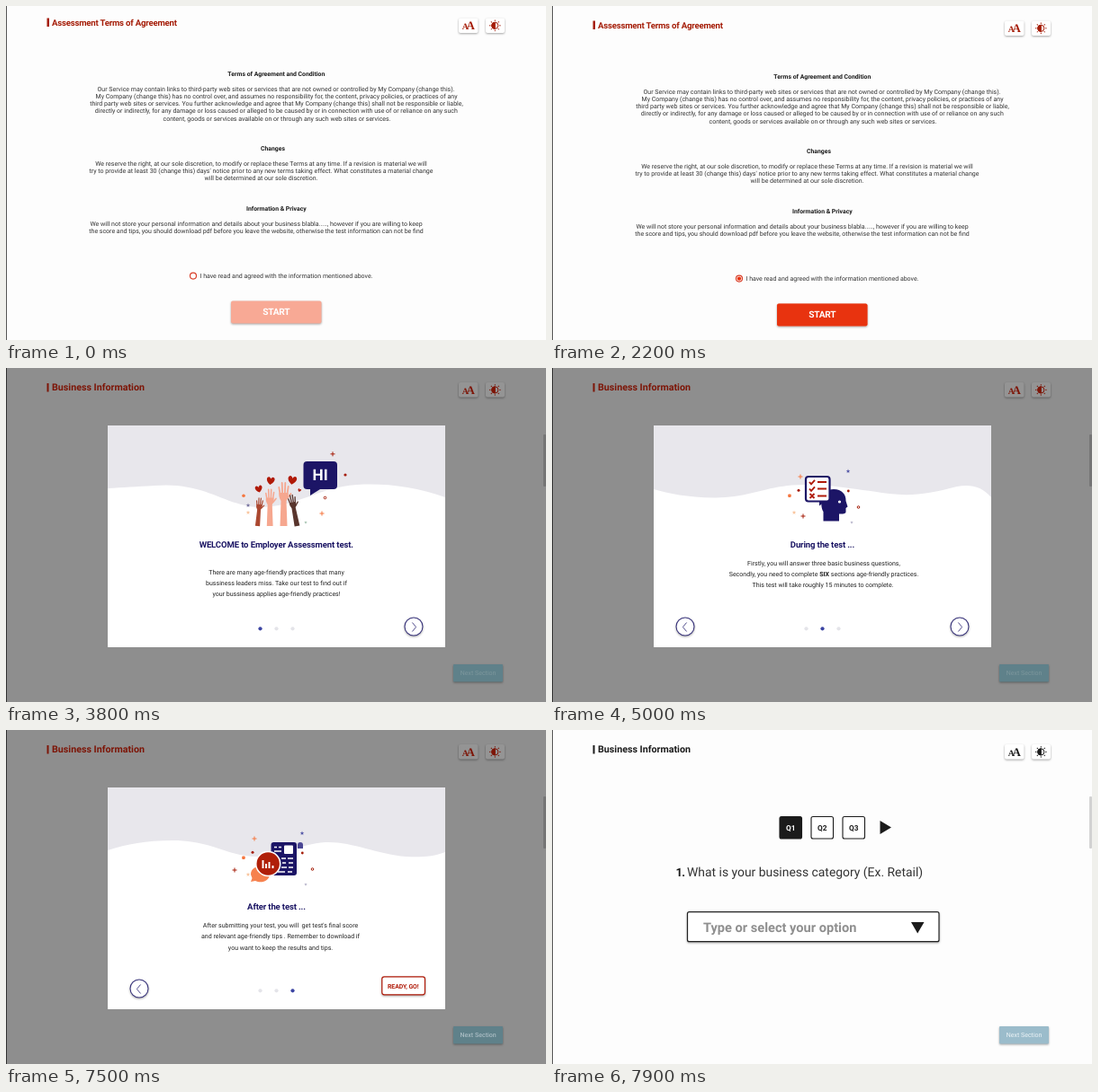
Write an HTML page that moves like this. It is 600 px wide and 372 px high and loops after 8000 ms.

```html
<!DOCTYPE html>
<html lang="en">
<head>
<meta charset="utf-8">
<title>Assessment</title>
<style>
html, body { margin: 0; width: 100%; height: 100%; overflow: hidden; background: #fdfdfd; }
svg { display: block; width: 600px; height: 372px; }
text { font-family: Roboto, "Liberation Sans", sans-serif; text-anchor: middle; text-rendering: geometricPrecision; white-space: pre; }
.l { text-anchor: start; }
.b { font-weight: 700; }
.t { font-weight: 700; letter-spacing: -.13px; fill: #1a1463; }
.serif { font-family: "Liberation Serif", serif; font-weight: 700; }
.chip { filter: drop-shadow(0 1px 1px rgba(0, 0, 0, .35)); }
</style>
</head>
<body>
<svg id="stage" viewBox="0 0 600 372"></svg>
<script>
const RED = '#a51d08', NAVY = '#1c1566', ORANGE = '#f5763f', PEACH = '#f6a78f', INK = '#1b1b1b';

const text = (x, y, s, size = 7, attr = '') => `<text x="${x}" y="${y}" font-size="${size}" ${attr}>${s}</text>`;
const rect = (x, y, w, h, fill, r = 0, attr = '') =>
  `<rect x="${x}" y="${y}" width="${w}" height="${h}" rx="${r}" fill="${fill}" ${attr}/>`;
const path = (d, fill = 'none', attr = '') => `<path d="${d}" fill="${fill}" ${attr}/>`;
const line = (d, color, w, attr = '') => path(d, 'none', `stroke="${color}" stroke-width="${w}" ${attr}`);
const dot = (x, y, r, fill, attr = '') => `<circle cx="${x}" cy="${y}" r="${r}" fill="${fill}" ${attr}/>`;
const group = (id, body, attr = '') => `<g id="${id}" ${attr}>${body}</g>`;
const lines = (rows, size) => rows.map(([x, y, s]) => text(x, y, s, size)).join('');

const plus = (x, y, c, r = 2.5) => line(`M${x - r} ${y}h${2 * r}M${x} ${y - r}v${2 * r}`, c, 1);
const ring = (x, y, c) => dot(x, y, 1.3, 'none', `stroke="${c}" stroke-width="1"`);
const heart = (x, y, s, r) =>
  path('M0 4C-7-1-4-5-2-4.5Q-.5-4 0-2.4Q.5-4 2-4.5C4-5 7-1 0 4Z', '#b01a08',
    `transform="translate(${x} ${y}) rotate(${r}) scale(${s})"`);
function star(x, y, c, r = 2.4) {
  let d = 'M';
  for (let i = 0; i < 10; i++) {
    const a = i * Math.PI / 5, q = i % 2 ? r * .45 : r;
    d += `${x + q * Math.sin(a)} ${y - q * Math.cos(a)} `;
  }
  return path(d + 'Z', c);
}
const hand = (x, s, lean, c) => `<g transform="translate(${x} 176) rotate(${lean}) scale(${s})">` +
  path('M-4 0L-3-28Q-6-33-5-37H5Q6-33 3-28L4 0Z', c) +
  line('M-4-36L-5.2-43M-1.4-37L-1.8-48M1.4-37L1.8-48M4-36L5.2-44M4-31L8-36', c, 1.8, 'stroke-linecap="round"') + '</g>';

// Text size and contrast buttons
function icons(dy, ink, chip) {
  let rays = '';
  for (let i = 0; i < 8; i++) rays += `<path d="M0-4.9V-6.3" transform="rotate(${i * 45})"/>`;
  return `<g transform="translate(0 ${dy})">` +
    rect(503, 13.5, 21.5, 16.5, chip, 2, 'class="chip"') + rect(533, 13.5, 21, 16.5, chip, 2, 'class="chip"') +
    text(510.4, 26.2, 'A', 9.8, `class="serif" fill="${ink}"`) +
    text(516.2, 26.2, 'A', 13, `class="serif" fill="${ink}"`) +
    `<g transform="translate(543.3 21.8)" stroke="${ink}" stroke-width="1">${rays}` +
    dot(0, 0, 3.6, 'none') + path('M0-3.6A3.6 3.6 0 0 0 0 3.6Z', ink) + '</g></g>';
}
const businessHeader = (ink, chip) => rect(45.5, 17, 2, 9.5, ink) +
  text(51, 25.4, 'Business Information', 10.7, `class="l b" fill="${ink}"`) + icons(2.6, ink, chip);
const nextButton = (fill, ink, id) => rect(497, 330, 55, 19.5, fill, 1, 'class="chip"') +
  text(524.6, 341.8, 'Next Section', 7.05, `id="${id}" fill="${ink}"`);
const leftEdge = color => rect(0, 0, 1, 372, color);
const scrollbar = color => rect(597, 74, 3, 58, color, 1);

const terms = rect(45.5, 13.5, 2.5, 9.5, RED) +
  text(51, 22, 'Assessment Terms of Agreement', 9.6, `class="l b" fill="${RED}" letter-spacing="-.2"`) +
  icons(0, RED, '#fff') +
  text(300.3, 77.5, 'Terms of Agreement and Condition', 6.85, 'class="b"') +
  text(296.5, 161, 'Changes', 6.85, 'class="b"') +
  text(300.3, 227.8, 'Information &amp; Privacy', 6.85, 'class="b"') +
  group('body', lines([
    [300, 95, 'Our Service may contain links to third-party web sites or services that are not owned or controlled by My Company (change this).'],
    [300.5, 103, 'My Company (change this) has no control over, and assumes no responsibility for, the content, privacy policies, or practices of any'],
    [300.5, 111.2, 'third party web sites or services. You further acknowledge and agree that My Company (change this) shall not be responsible or liable,'],
    [300.3, 119.4, 'directly or indirectly, for any damage or loss caused or alleged to be caused by or in connection with use of or reliance on any such'],
    [301, 127.5, 'content, goods or services available on or through any such web sites or services.'],
    [283.5, 178, 'We reserve the right, at our sole discretion, to modify or replace these Terms at any time. If a revision is material we will'],
    [283.5, 186, "try to provide at least 30 (change this) days' notice prior to any new terms taking effect. What constitutes a material change"],
    [283.5, 194, 'will be determined at our sole discretion.'],
    [278, 244.5, 'We will not store your personal information and details about your business blabla....., however if you are willing to keep'],
    [278, 253, 'the score and tips, you should download pdf before you leave the website, otherwise the test information can not be find'],
    [311.5, 303.3, 'I have read and agreed with the information mentioned above.']
  ]), 'fill="#333"') +
  dot(208, 300.6, 3.5, '#fff', 'stroke="#d9402a" stroke-width="1.2"') +
  rect(250, 328.5, 100.5, 25, '#f8a995', 2, 'class="chip"') +
  group('agreed', dot(208, 300.6, 2.2, '#e8330f') + rect(250, 328.5, 100.5, 25, '#e8330f', 2)) +
  text(300.3, 344.2, 'START', 10.2, 'class="b" fill="#fff" letter-spacing="-.3"');

const qBox = (x, s, fill, ink) => rect(x, 96.5, 24.5, 24.5, fill, 2, `stroke="${INK}" stroke-width="1.1"`) +
  text(x + 12.2, 111.7, s, 8.3, `class="b" fill="${ink}"`);
const question = rect(0, 0, 600, 372, '#fdfdfd') + businessHeader(INK, '#fff') +
  qBox(253, 'Q1', INK, '#fff') + qBox(288, 'Q2', '#fff', INK) + qBox(323, 'Q3', '#fff', INK) +
  path('M364.5 101L377 108.5L364.5 116Z', INK) +
  text(137.5, 162.8, '1.', 13, 'class="l b" letter-spacing="-.8"') +
  text(150, 162.8, 'What is your business category (Ex. Retail)', 13.9, 'class="l" fill="#333"') +
  rect(150.5, 202.7, 279.5, 33, '#fff', 2, 'stroke="#222" stroke-width="1.2" class="chip"') +
  text(168, 224.5, 'Type or select your option', 14.6, 'class="l b" fill="#8f8f8f"') +
  path('M399 214H413.5L406.2 226.5Z', INK) + nextButton('#9bbccb', '#edf4f7', 'nextPlain') +
  leftEdge('#555') + scrollbar('#d2d2d2');

const wave = curve => path(`M113 64H488V${curve}Z`, '#e8e7ec');
const arrow = (x, dir) => dot(x, 288, 10, '#fff', 'stroke="#39347c" stroke-width="1.1" class="chip"') +
  line(`M${x - dir * 1.6} 283.5l${dir * 4.2} 5l${-dir * 4.2} 5`, '#39347c', .9);
const pager = n => [0, 1, 2].map(i => dot(282.5 + 18 * i, 290.3, 2.1, i === n ? '#3c45a3' : '#e4e4e9')).join('');
const confetti = plus(276, 121, ORANGE) + star(329, 115, '#5558a8') + rect(262.2, 140.5, 3.5, 3.5, ORANGE, 1) +
  dot(274, 136.3, 1.5, RED) + dot(329.3, 137, 1.4, RED) + ring(340.5, 155, RED) + star(269, 161, '#f9c49c') +
  star(333, 172, '#b9b6cc', 1.8);

const welcome = wave('144C455 132 420 128 390 130C345 133 325 155 280 155C245 154 220 126 165 131C145 132 130 133 113 134') +
  hand(293.2, .85, 0, PEACH) + hand(308.5, 1, 0, PEACH) + hand(279.5, .65, 5, '#ab4830') + hand(323.5, .73, -11, '#59352d') +
  heart(281, 135, .9, -12) + heart(294, 126, 1, 8) + heart(318, 125.5, 1.1, 10) + heart(326, 136.3, .4, 20) +
  rect(330.5, 104, 37.5, 31, NAVY, 4) + path('M338 134V142L349 135Z', NAVY) +
  text(349.2, 125.2, 'HI', 17.2, 'class="b" fill="#fff"') +
  plus(363, 95.8, RED) + dot(377, 119, 1.6, RED) + ring(354.5, 144.5, RED) + plus(351, 162, ORANGE) +
  star(269, 153, '#77739f') + dot(264, 142.3, 1.8, ORANGE) + star(269, 161, '#f9c49c') + star(333, 172, '#a9c5b4', 1.8) +
  text(300.3, 199.6, 'WELCOME to Employer Assessment test.', 9.55, 'class="t"') +
  lines([
    [300.5, 229.6, 'There are many age-friendly practices that many'],
    [300.5, 242, 'bussiness leaders miss. Take our test to find out if'],
    [300.5, 254.3, 'your bussiness applies age-friendly practices!']
  ], 7.05) + pager(0);

const check = y => line(`M286 ${y}l2 2.4l4-4.6M295 ${y}h10`, '#b01a08', 1.9);
const during = wave('144C478 132 465 129 450 132C420 140 400 143 375 140C330 134 310 130 280 130C240 130 220 145 180 144.5C150 144 130 140 113 135') +
  path('M301.5 170.5V160C297 152 299 135 313 135C322 135 327 141 326.5 148L328.5 154.5L326.5 156V160.5Q326 163 319 162.5V170.5Z', NAVY) +
  path('M297 147V153.5L304 148Z', NAVY) +
  rect(282, 121, 26.5, 27.5, '#fff', 3, `stroke="${NAVY}" stroke-width="2.2"`) +
  check(127) + check(134.5) + line('M286.5 140l5 5m0-5l-5 5M295 142.5h10', '#b01a08', 1.9) +
  dot(319.5, 149, 1.6, '#fff') + confetti + plus(279, 165, RED) +
  text(300.5, 199.6, 'During the test ...', 9.5, 'class="t"') +
  lines([
    [302, 220, 'Firstly, you will answer three basic business questions,'],
    [302, 232.3, 'Secondly, you need to complete <tspan class="b">SIX</tspan> sections age-friendly practices.'],
    [301, 244, 'This test will take roughly 15 minutes to complete.']
  ], 7.05) + pager(1);

const after = wave('136C475 141 460 142 445 141C410 138 385 124 355 125C325 127 310 141 280 141C245 141 230 123 185 123C155 123 135 127 113 134') +
  path('M324 132V128Q324 125 327 125Q330 125 330 128V132Z', '#4b4794') + rect(294.5, 125, 28.5, 37, NAVY, 3) +
  rect(309, 128.5, 10, 9.5, '#fff', 1) +
  line('M298 130.5h3m2 0h3M298 135h8M306 143h5m2 0h6M307 148h4m3 0h5M306 153h6m2 0h5M302 158h8m3 0h5', '#fff', 1.5) +
  path('M272 161C272 149 293 149 293 160C293 169 283 171 277 168L272 169L273.5 165Z', '#f6824f') +
  dot(291.2, 149, 13.5, '#b01f08', 'stroke="#fff" stroke-width="1.6"') +
  line('M285.5 154v-9M289 154v-5M292.5 154v-7M296.5 154v-3', '#fff', 1.9) + confetti + plus(254, 156, RED) +
  text(300.5, 199.6, 'After the test ...', 9.5, 'class="t"') +
  lines([
    [305, 220, "After submitting your test, you will  get test's final score"],
    [305, 232.3, 'and relevant age-friendly tips . Remember to download if'],
    [305, 244.6, 'you want to keep the results and tips.']
  ], 7.05) + pager(2) +
  rect(417.8, 274.8, 47.7, 20, '#fff', 2.5, 'stroke="#b01a08" stroke-width="1.2" class="chip"') +
  text(441.3, 287.5, 'READY, GO!', 6.9, 'class="b" fill="#b01a08" letter-spacing="-.1"');

const modal = rect(0, 0, 600, 372, '#8e8e8e') + businessHeader('#7d1507', '#949494') +
  nextButton('#5f818a', '#7d979d', 'nextDim') + leftEdge('#333') + scrollbar('#757575') +
  rect(113, 64, 375, 247, '#fff') +
  group('slide0', welcome) + group('slide1', during) + group('slide2', after) +
  group('back', arrow(148, -1)) + group('forward', arrow(453, 1));

const stage = document.getElementById('stage');
stage.innerHTML = group('terms', terms, `fill="${INK}"`) + leftEdge('#555') +
  group('question', question, `fill="${INK}"`) + group('modal', modal, 'fill="#222"');

const el = id => document.getElementById(id);
const ramp = (t, a, b) => Math.min(1, Math.max(0, (t - a) / (b - a)));
const ease = p => 1 - (1 - p) ** 2;
const fade = (id, v) => {
  el(id).style.opacity = v;
  el(id).style.display = v > 0 ? '' : 'none';
};

function draw(now) {
  const t = Math.floor(now % 8000 / 100) * 100; // ten pictures a second
  const y = .5 * ramp(t, 0, 400) + 2.5 * ease(ramp(t, 500, 1200));
  el('terms').setAttribute('transform', `translate(0 ${y})`);
  fade('agreed', ramp(t, 1900, 2200));

  const second = ramp(t, 4200, 4500), third = ramp(t, 6300, 6600);
  fade('question', t >= 2500 ? 1 : 0);
  fade('modal', t >= 2500 ? 1 - ramp(t, 7500, 7700) : 0);
  fade('slide0', 1 - second);
  fade('slide1', second * (1 - third));
  fade('slide2', third);
  fade('back', second);
  fade('forward', 1 - third);
  el('nextDim').setAttribute('fill', t >= 6400 ? '#a9bcc3' : '#7d979d');
  el('nextDim').setAttribute('font-weight', t >= 6400 ? 500 : 400);
}

const start = performance.now();
function tick() {
  draw(performance.now() - start);
  requestAnimationFrame(tick);
}
tick();
</script>
</body>
</html>
```
